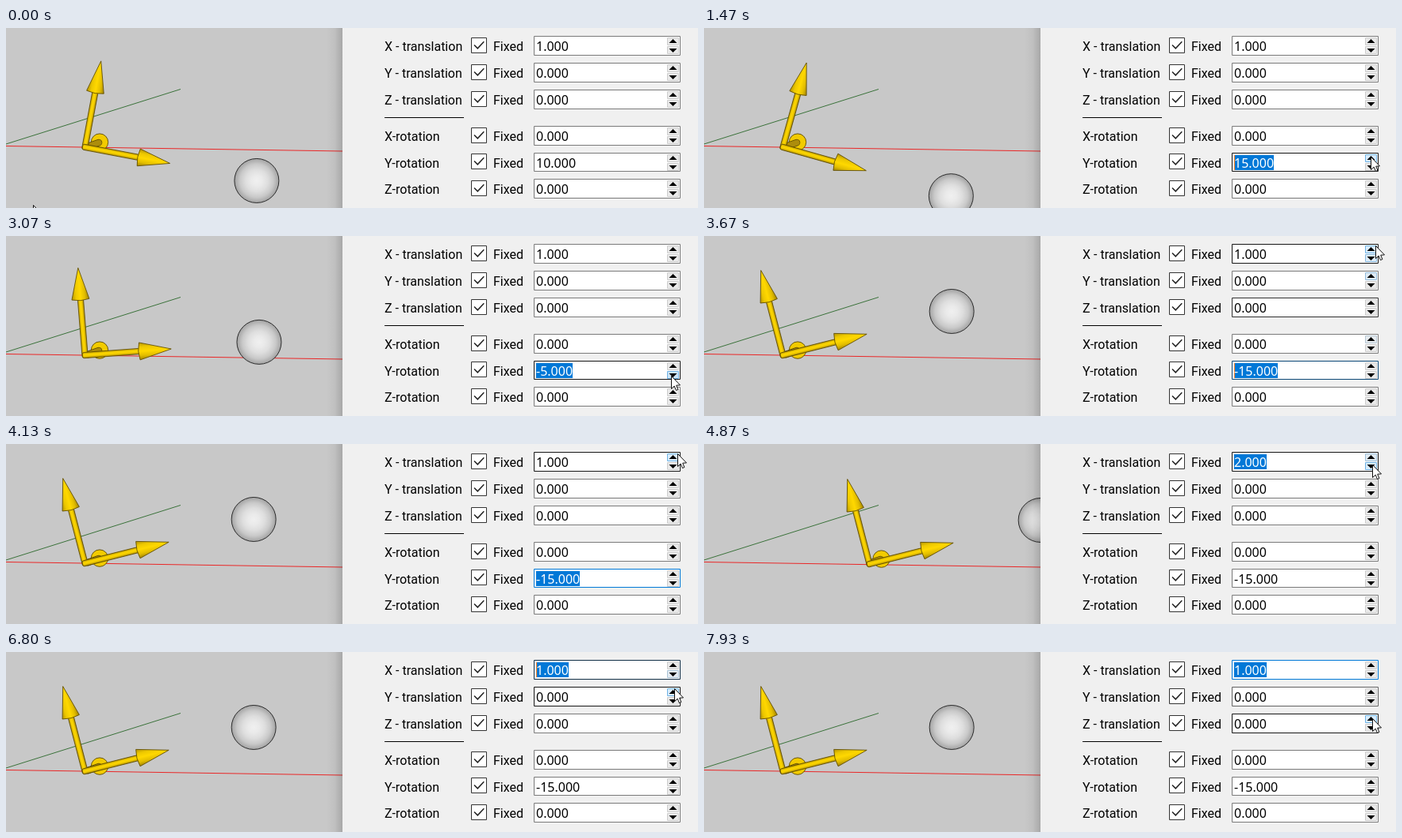
These frames come from a looping animation (872 by 228 pixels, 8000 ms). An HTML page with a canvas:

```html
<!DOCTYPE html>
<html lang="en">
<head>
<meta charset="utf-8">
<title>Rotation and translation inputs</title>
<style>
html, body { margin: 0; width: 100%; height: 100%; overflow: hidden; background: #f0f0f0; }
canvas { display: block; }
</style>
</head>
<body>
<canvas id="stage" width="872" height="228"></canvas>
<script>
const ctx = document.getElementById('stage').getContext('2d');
const LOOP = 8000, TICK = 200 / 3, VIEW_W = 424, RAD = Math.PI / 180;
const OUTLINE = '#5c4a00';

// Two groups of three evenly spaced rows.
const rows = ['X', 'Y', 'Z', 'X', 'Y', 'Z'].map((axis, i) => {
  const top = (i < 3 ? 10.2 : 123.8) + 33.8 * (i % 3);
  const y = Math.round(top);
  return {
    label: axis + (i < 3 ? ' - translation' : '-rotation'),
    y,
    h: Math.round(top + 24.8) - y,
    check: Math.round(top + 1.8)
  };
});

// Pointer glides: start, end, and where the tip comes to rest.
const glides = [
  [70, 930, 840, 163],
  [1730, 2070, 838, 177],
  [3440, 3665, 846, 12],
  [4530, 4870, 842, 26],
  [5470, 5670, 846, 12],
  [6460, 6870, 842, 49],
  [7260, 7930, 842, 84]
];

const clamp = (v, lo, hi) => Math.min(hi, Math.max(lo, v));

// Clicks made so far in a run of n, one every gap ms.
const clicks = (t, first, gap, n) => clamp(Math.floor((t - first) / gap) + 1, 0, n);
const rotationAt = t => 10 + 5 * clicks(t, 1195, 465, 2) - 5 * clicks(t, 2260, 195, 7);
const shiftAt = t => 1 + clicks(t, 4325, 1, 1) - clicks(t, 4995, 330, 2) + clicks(t, 5795, 1, 1);
const focusAt = t => t >= 4325 ? 0 : t >= 1195 ? 4 : -1;

function pointerAt(t) {
  let x = 34, y = 224;
  for (const [from, to, tx, ty] of glides) {
    let k = clamp((t - from) / (to - from), 0, 1);
    k = k * k * (3 - 2 * k);
    x += (tx - x) * k;
    y += (ty - y) * k;
  }
  return [x, y];
}

// Strongest recent hover over a box, fading out after the pointer leaves.
function hover(t, x, y, w, h, fade) {
  for (let k = 0; k < 8; k++) {
    const [px, py] = pointerAt(t - k * fade / 8);
    if (px >= x && px < x + w && py >= y && py < y + h) return 1 - k / 8;
  }
  return 0;
}

function mix(a, b, k) {
  return 'rgb(' + a.map((v, i) => Math.round(v + (b[i] - v) * k)) + ')';
}

function addStops(gradient, ...colors) {
  colors.forEach((c, i) => gradient.addColorStop(i / (colors.length - 1), c));
  return gradient;
}

function trace(pts) {
  ctx.beginPath();
  pts.forEach(([x, y]) => ctx.lineTo(x, y));
}

function line(color, width, ...pts) {
  trace(pts);
  ctx.strokeStyle = color;
  ctx.lineWidth = width;
  ctx.stroke();
}

function paint(fill, stroke, width = 1) {
  ctx.fillStyle = fill;
  ctx.fill();
  ctx.strokeStyle = stroke;
  ctx.lineWidth = width;
  ctx.stroke();
}

function box(x, y, w, h, fill, stroke) {
  ctx.beginPath();
  ctx.rect(x + .5, y + .5, w - 1, h - 1);
  paint(fill, stroke);
}

function gold(r) {
  return addStops(ctx.createLinearGradient(0, -r, 0, r),
    '#b39200', '#edc800', '#ffd800', '#e3be00', '#a08200');
}

function arrow(x, y, angle, len) {
  const base = len - 40;
  ctx.save();
  ctx.translate(x, y);
  ctx.rotate(angle * RAD);
  ctx.beginPath();
  ctx.roundRect(-3, -3.6, base + 4, 7.2, 2);
  paint(gold(3.6), OUTLINE, .8);
  ctx.beginPath();
  ctx.moveTo(len, 0);
  ctx.lineTo(base, 11);
  ctx.quadraticCurveTo(base - 3, 0, base, -11);
  ctx.closePath();
  paint(gold(11), OUTLINE, .8);
  ctx.restore();
}

// The arrow pointing away: the back of its cone and a shaded shaft.
function farArrow(x, y) {
  ctx.beginPath();
  ctx.arc(x, y, 10.7, 0, 7);
  paint('#f2cb00', OUTLINE, .9);
  ctx.lineCap = 'round';
  for (const [color, width] of [[OUTLINE, 8.6], ['#ad8d0c', 7.2]]) {
    line(color, width, [x - 15, y + 5.5], [x - 1, y + .5]);
  }
  ctx.lineCap = 'butt';
}

function sphere(x, y) {
  ctx.beginPath();
  ctx.arc(x, y, 28, 0, 7);
  paint(addStops(ctx.createRadialGradient(x, y, 0, x, y, 28),
    '#f0f0f0', '#eaeaea', '#dedede', '#c9c9c9', '#a2a2a2'), '#1c1c1c', .9);
}

function drawView(angle, shift) {
  const move = shift - 1, a = (angle * 1.03 + .4) * RAD;
  const x = 99.5 + 109 * move, y = 151 + move;
  ctx.save();
  ctx.beginPath();
  ctx.rect(0, 0, VIEW_W, 228);
  ctx.clip();
  ctx.fillStyle = '#c8c8c8';
  ctx.fillRect(0, 0, VIEW_W, 228);
  line('#2a682a', .9, [0, 147], [220, 77.5]);
  line('#ee1616', .9, [0, 149.5], [VIEW_W, 156]);
  sphere(99.7 + 112 * move + 220 * Math.cos(a), 152.6 + move + 220 * Math.sin(a));
  farArrow(118 + 105.5 * move, 144.6 + move);
  arrow(x, y, angle + .5 - 90, 111);
  arrow(x, y, angle + .8, 109);
  // Soft shadow beside the panel.
  ctx.fillStyle = addStops(ctx.createLinearGradient(VIEW_W - 20, 0, VIEW_W, 0),
    'rgba(0,0,0,0)', 'rgba(0,0,0,.04)', 'rgba(0,0,0,.16)');
  ctx.fillRect(VIEW_W - 20, 0, 20, 228);
  ctx.restore();
}

function spinButton(t, y, dir) {
  const glow = hover(t, 833, y, 18, 11, 200);
  const changed = rotationAt(t) !== rotationAt(t - 100) || shiftAt(t) !== shiftAt(t - 100);
  const fill = glow === 1 && changed ? '#cce4f7' : mix([234, 234, 234], [218, 237, 252], glow);
  box(833, y, 15, 10, fill, mix([205, 205, 205], [110, 178, 230], glow));
  trace([[840.5, y + 5 - 3 * dir], [845.5, y + 5 + 2 * dir], [835.5, y + 5 + 2 * dir]]);
  ctx.fillStyle = '#000';
  ctx.fill();
}

function drawRow(t, { label, y, h, check }, value, focus) {
  ctx.fillStyle = '#000';
  ctx.font = '16px Roboto, sans-serif';
  ctx.fillText(label, 477, y + 19);
  ctx.fillText('Fixed', 614, y + 19);
  box(586, check, 20, 20, '#fff', '#333');
  line('#222', 1.5, [590, check + 9.5], [594.3, check + 13.8], [602.3, check + 5.2]);

  const rest = focus ? [0, 120, 215] : [122, 122, 122];
  box(665, y, 185, h, '#fff', mix(rest, [23, 23, 23], hover(t, 665, y, 185, h, 450)));
  const text = value.toFixed(3);
  ctx.font = '16px "Noto Sans", "Open Sans", sans-serif';
  if (focus) {
    ctx.fillStyle = '#0078d7';
    ctx.fillRect(668, y + 3, Math.round(ctx.measureText(text).width), 19);
    if (Math.floor((t - 510) / 530) % 2) {
      ctx.fillStyle = '#ff8728';
      ctx.fillRect(668, y + 3, 1, 19);
    }
  }
  ctx.fillStyle = focus ? '#fff' : '#000';
  ctx.fillText(text, 668, y + 19);
  spinButton(t, y + 2, 1);
  spinButton(t, y + 13, -1);
}

function drawPointer(x, y) {
  ctx.save();
  ctx.translate(Math.round(x) + .5, Math.round(y) + .5);
  trace([[0, 0], [0, 16], [3.7, 12.6], [6, 18], [8.4, 17], [6.2, 11.7], [11, 11.4]]);
  ctx.closePath();
  paint('#fff', '#111');
  ctx.restore();
}

function draw(t) {
  const values = [shiftAt(t), 0, 0, 0, rotationAt(t), 0];
  ctx.fillStyle = '#f0f0f0';
  ctx.fillRect(0, 0, 872, 228);
  drawView(values[4], values[0]);
  ctx.fillStyle = '#000';
  ctx.fillRect(477, 113, 100, 1);
  rows.forEach((row, i) => drawRow(t, row, values[i], i === focusAt(t)));
  drawPointer(...pointerAt(t));
}

const start = performance.now();
function frame() {
  const t = Math.max(0, performance.now() - start) % LOOP;
  draw(Math.floor((t + 4) / TICK) * TICK % LOOP);
  requestAnimationFrame(frame);
}
frame();
</script>
</body>
</html>
```
